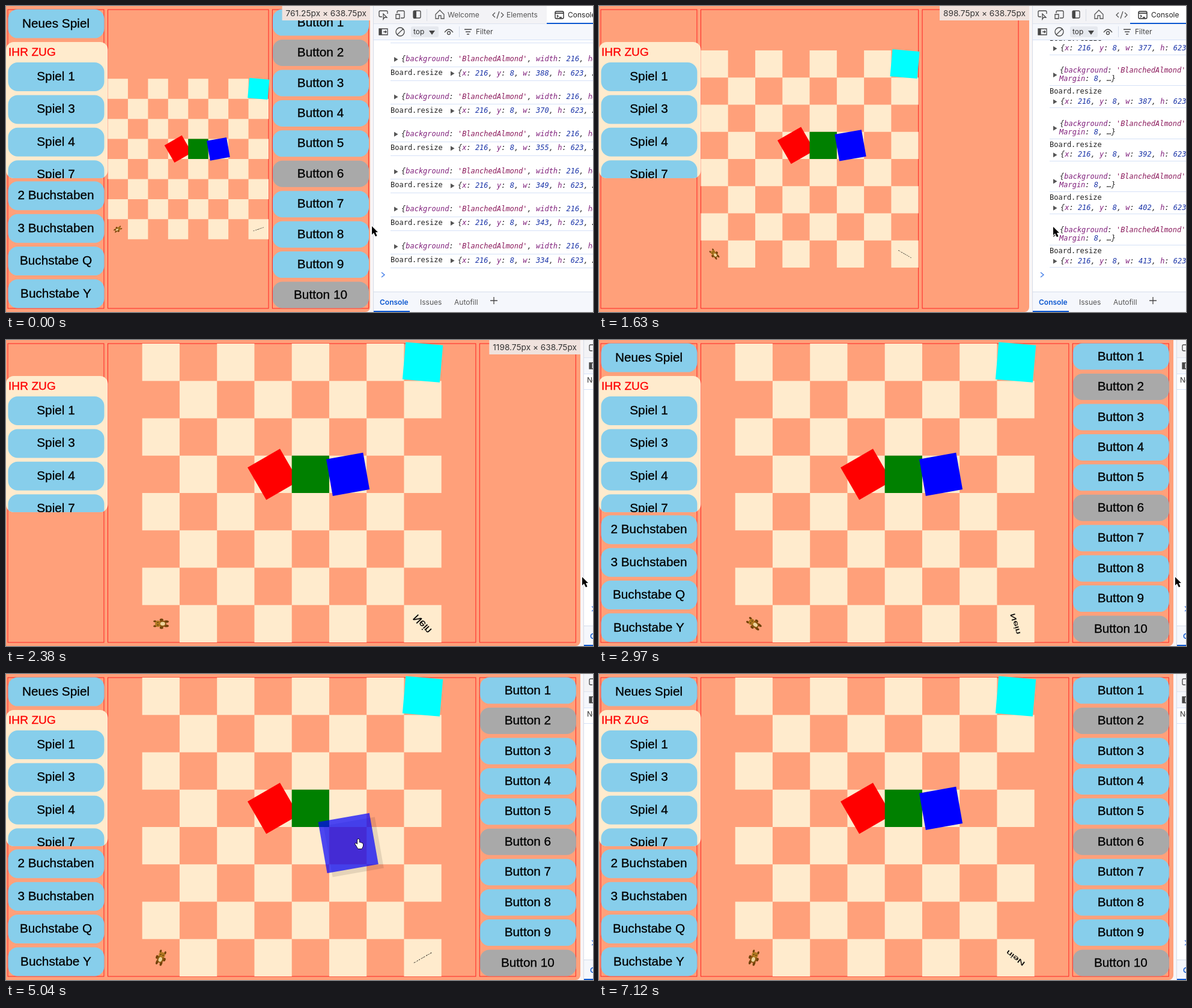
Animation of 977x510 px, one loop 7.14 s. Source, as an HTML page with a canvas:

```html
<!DOCTYPE html>
<html lang="de">
<head>
<meta charset="utf-8">
<title>Board resize and drag</title>
<style>
html, body { margin: 0; width: 100%; height: 100%; overflow: hidden; background: #fff; }
canvas { display: block; }
</style>
</head>
<body>
<canvas id="stage" width="977" height="510"></canvas>
<script>
const c = document.getElementById('stage').getContext('2d');
const LOOP = 7140, W = 977, H = 510;
const SANS = '"Liberation Sans", Arial, sans-serif';
const UI = 'Inter, Roboto, sans-serif';
const MONO = '"DejaVu Sans Mono", "Liberation Mono", monospace';
const SKY = '#87ceeb', CREAM = '#ffebcd', SALMON = '#ffa07a', ICON = '#474747';

// Linear interpolation through [step, value] points.
function along(k, pts) {
  if (k <= pts[0][0]) return pts[0][1];
  for (let i = 1; i < pts.length; i++) {
    const [a, u] = pts[i - 1], [b, v] = pts[i];
    if (k <= b) return u + (v - u) * (k - a) / (b - a);
  }
  return pts[pts.length - 1][1];
}

const DIVIDER = [[6, 609], [7, 610], [8, 622], [9, 644], [10, 678], [11, 719], [13, 820], [15, 940], [15.7, 959]];
const POINTER_X = [[0, 609], [7, 611], [11, 756], [16, 959], [22, 959], [25, 576], [26, 577], [34, 588], [38, 592], [40, 580], [45, 940]];
const POINTER_Y = [[0, 367], [11, 368], [16, 395], [22, 395], [25, 227], [26, 232], [34, 283], [38, 300], [40, 228], [45, 520]];
const LIFT = [[25, 0], [26, 1], [40, 1], [41, 0]];
const DRAG_X = [[25, 0], [26, 1], [34, .6], [38, 5], [41, 0]];
const DRAG_Y = [[25, 0], [26, 5.6], [34, 58], [38, 75], [41, 0]];
const WORD_TURN = [[0, -20], [7, 11], [11, 30], [16, 47], [26, 115], [34, 150], [48, 217]];
const BEAR_TURN = [[0, 60], [7, 40], [11, -40], [16, -90], [26, 0], [34, 20], [48, 20]];

function rect(x, y, w, h, fill, r = 0) {
  c.fillStyle = fill;
  c.beginPath();
  c.roundRect(x, y, w, h, r);
  c.fill();
}

function text(s, x, y, font, color = '#111', align = 'left') {
  c.font = font;
  c.fillStyle = color;
  c.textAlign = align;
  c.textBaseline = 'middle';
  c.fillText(s, x, y);
}

// Page text with slightly heavier strokes.
function pageText(s, x, y, size, color = '#000', align = 'center') {
  text(s, x, y, size + 'px ' + SANS, color, align);
  c.strokeStyle = color;
  c.lineWidth = .3;
  c.strokeText(s, x, y);
}

function at(x, y, deg, draw) {
  c.save();
  c.translate(x, y);
  c.rotate(deg * Math.PI / 180);
  draw();
  c.restore();
}

function icon(x, y, d, color = ICON, fill = false) {
  at(x, y, 0, () => {
    c.strokeStyle = c.fillStyle = color;
    c.lineWidth = 1.3;
    const p = new Path2D(d);
    fill ? c.fill(p) : c.stroke(p);
  });
}

function outline(x, w) {
  c.strokeStyle = '#f22';
  c.lineWidth = 1;
  c.strokeRect(x, 6, w, 498);
}

function button(label, x, y, h, color = SKY) {
  rect(x, y, 160, h, color, 16);
  pageText(label, x + 79.5, y + h / 2 + .3, 20.8);
}

function square(x, y, size, deg, color) {
  at(x, y, deg, () => rect(-size / 2, -size / 2, size, size, color));
}

function leftPanel(showButtons) {
  rect(0, 60, 169.5, 227, CREAM, 13);
  pageText('IHR ZUG', 4, 77.7, 19.2, '#f00', 'left');
  c.save();
  c.beginPath();
  c.roundRect(0, 60, 169.5, 227, 13);
  c.clip();
  [1, 3, 4, 7].forEach((n, i) => button('Spiel ' + n, 3.5, 94 + 54.4 * i, 48));
  c.restore();
  if (!showButtons) return;
  button('Neues Spiel', 3.5, 5.6, 48);
  ['2 Buchstaben', '3 Buchstaben', 'Buchstabe Q', 'Buchstabe Y']
    .forEach((s, i) => button(s, 3.5, 292.3 + 54.4 * i, 48));
}

function bear(x, y, cell, deg) {
  at(x, y, deg, () => {
    c.scale(cell / 62, cell / 62);
    const blob = (px, py, rx, ry, color) => {
      c.fillStyle = color;
      c.beginPath();
      c.ellipse(px, py, rx, ry, 0, 0, 7);
      c.fill();
    };
    for (const s of [-1, 1]) {
      blob(4 * s, -10, 1.7, 2.6, '#704008');
      blob(6.5 * s, 1, 2, 3, '#704008');
      blob(3.5 * s, 9, 2, 4, '#704008');
    }
    blob(0, 2, 5.6, 7, '#8a5410');
    blob(0, -5, 5.3, 4.6, '#b07820');
    blob(0, 3, 3, 4, '#ecd29a');
    for (const s of [-1, 1]) blob(2 * s, -5, .8, .8, '#321c04');
  });
}

function board(k, right) {
  const size = Math.min(right - 169.5, 498), cell = size / 8;
  const left = (169.5 + right - size) / 2, top = 255 - size / 2;
  const cx = n => left + (n + .5) * cell, cy = n => top + (n + .5) * cell;
  for (let i = 0; i < 64; i++) {
    const col = i % 8, row = i >> 3;
    if ((col + row) % 2 === 0) rect(left + col * cell, top + row * cell, cell, cell, CREAM);
  }
  bear(cx(0), cy(7), cell, along(k, BEAR_TURN));
  at(cx(7), cy(7), along(k, WORD_TURN), () => {
    const flip = Math.sin(Math.PI * (k + .4) / 11.5);
    c.scale(1, Math.abs(flip) < .08 ? .08 : flip);
    pageText('Nein', 0, 0, cell * .28);
  });
  square(cx(7), cy(0), cell, 5, '#0ff');
  square(cx(3), cy(3), cell, -30, '#f00');
  square(cx(4), cy(3), cell, 0, '#008000');

  const lift = along(k, LIFT), side = cell * (1 + .39 * lift);
  const bx = cx(5) + along(k, DRAG_X), by = cy(3) + along(k, DRAG_Y);
  if (lift) square(bx + 9 * lift, by + 6.5 * lift, side, -10, 'rgba(0,0,0,.1)');
  square(bx, by, side, -10, `rgba(0,0,255,${1 - .3 * lift})`);
}

// Console values: keys, strings and numbers are coloured by pattern.
function code(s, x, y) {
  const font = 'italic 12px ' + MONO;
  for (const part of s.match(/'[^']*'|\w+(?=:)|\d+|[^\w']+|\w+/g)) {
    const color = part[0] === "'" ? '#8b1a5c' : /^\d/.test(part) ? '#1a34a8'
      : /^\w/.test(part) ? '#80207c' : '#222';
    text(part, x, y, font, color);
    x += c.measureText(part).width;
  }
}

function entry(s, x, y) {
  icon(x, y, 'M-2.5-4L4 0-2.5 4Z', '#555', true);
  code(s, x + 9.5, y);
}

function log(k, x, width) {
  const line = y => rect(x + 28, y, W, 1, '#d5e1f7');
  const label = y => text('Board.resize', x + 28, y, '12px ' + MONO, '#222');
  const size = w => `{x: 216, y: 8, w: ${w}, h: 623, …}`;
  c.save();
  c.beginPath();
  c.rect(x, 57, W, 419);
  c.clip();
  if (width < 60) {
    text('No Issues', x + 5, 67, '12px ' + UI, '#333');
    rect(x, 82, W, 1, '#d5e1f7');
  } else if (width > 300) {
    line(61);
    [388, 370, 355, 349, 343, 334].forEach((w, i) => {
      const y = 89 + 62.4 * i;
      entry("{background: 'BlanchedAlmond', width: 216, height: 623, …}", x + 36.5, y);
      line(Math.round(y + 12));
      label(y + 23);
      entry(size(w), x + 130.5, y + 23.5);
      line(Math.round(y + 35));
    });
  } else {
    [377, 387, 392, 402, 413].forEach((w, i) => {
      const y = 54.5 + 88.6 * i;
      if (i) {
        icon(x + 36.5, y - 28, 'M-2.5-4L4 0-2.5 4Z', '#555', true);
        code("{background: 'BlanchedAlmond'", x + 45, y - 35);
        code('Margin: 8, …}', x + 44, y - 21);
        line(Math.round(y - 11));
      }
      label(y);
      entry(size(w + Math.max(0, k - 11) * 30), x + 36.5, y + 16.5);
      line(Math.round(y + 26));
    });
  }
  c.restore();
}

function devtools(k, x) {
  const width = W - x, ui = '12px ' + UI;
  rect(x, 0, W, H, '#fff');
  rect(x, 0, W, 30, '#f3f3f6');
  rect(x, 30, W, 26, '#f5f7fc');
  rect(x, 29, W, 1, '#dde3ee');
  rect(x, 56, W, 1, '#d5e1f7');

  icon(x + 16, 14, 'M-2 4H-5Q-7 4-7 2V-4Q-7-6-5-6H5Q7-6 7-4V-1M0-1V8L2 5 6 5Z');
  icon(x + 44, 14, 'M-5-2V-4Q-5-6-3-6H5Q7-6 7-4V4Q7 6 5 6H1M-7 0H-1V7H-7Z');
  icon(x + 72, 14, 'M-4-6H4Q6-6 6-4V4Q6 6 4 6H-4Q-6 6-6 4V-4Q-6-6-4-6Z');
  rect(x + 66, 8, 5, 13, ICON, 1);
  rect(x + 88, 5, 1, 20, '#d8dce4');

  const wide = width > 300, full = width >= 365;
  icon(x + 110, 14, 'M-7 0L0-7 7 0V7H2V2H-2V7H-7Z', '#555');
  if (wide) text('Welcome', x + 123, 15, ui, '#555');
  const tagX = x + (wide ? 207 : 148);
  icon(tagX, 15, 'M-5-4L-9 0-5 4M5-4L9 0 5 4M2-6L-2 6', '#555');
  if (full) text('Elements', tagX + 14, 15, ui, '#555');
  const tab = full ? x + 288 : tagX + 14;
  rect(tab, 0, 95, 30, '#fff');
  rect(tab, 28, 95, 2, '#0b57d0');
  icon(tab + 21, 15, 'M-5-6H5Q7-6 7-4V4Q7 6 5 6H-5Q-7 6-7 4V-4Q-7-6-5-6ZM-7-3H7M-4 0L-2 2-4 4M0 4H4', '#222');
  text('Console', tab + 35, 15, ui, '#222');
  icon(tab + 116, 15, 'M-4-1Q-4-4 0-4T4-1V3Q4 7 0 7T-4 3ZM-3-4L-5-7M3-4L5-7M-4 1H-8M4 1H8M-4-1L-7-4M4-1L7-4M-4 4L-7 7M4 4L7 7M0-4V7');

  icon(x + 16, 43, 'M-7-5H7V5H-7ZM-3-5V5M0 0H5M3-2L5 0 3 2');
  rect(x + 9, 38, 4, 10, ICON);
  icon(x + 44, 43, 'M7 0A7 7 0 1 1-7 0A7 7 0 1 1 7 0M5-5L-5 5');
  rect(x + 62, 34, 46, 18, '#e6e9ef', 3);
  text('top', x + 66, 43.5, ui, '#333');
  icon(x + 97, 44, 'M-5-3H5L0 4Z', '#444', true);
  icon(x + 125, 43, 'M-7 1Q0-9 7 1M2.5 2A2.5 2.5 0 1 1-2.5 2A2.5 2.5 0 1 1 2.5 2');
  rect(x + 142, 34, 1, 18, '#d5dcea');
  icon(x + 157, 43, 'M-6-4H6M-4 0H4M-2 4H2');
  text('Filter', x + 170, 43.5, ui, '#444');

  log(k, x, width);
  icon(x + 15, 448, 'M-2-4L3 0-2 4', '#3b78e7');

  rect(x, 476, W, 34, '#f5f7fc');
  rect(x, 476, W, 1, '#d5dcea');
  text('Console', x + 10, 494, '600 12px ' + UI, '#0b57d0');
  text('Issues', x + 77, 494, ui, '#555');
  text('Autofill', x + 134, 494, ui, '#555');
  icon(x + 200, 491, 'M-6 0H6M0-6V6');
  rect(x, 508, 60, 2, '#0b57d0');
  rect(x - 1, 0, 1, H, '#d6dce8');
}

function tooltip(divider) {
  const s = (Math.round(divider) / .8).toFixed(2) + 'px × 638.75px';
  const font = '13.7px ' + UI;
  c.font = font;
  const w = c.measureText(s).width + 12;
  rect(divider - 3 - w, 0, w, 24, '#f0e2dd');
  text(s, divider - 9, 12.5, font, '#333', 'right');
}

function pointer(k) {
  const hand = k >= 25 && k < 41;
  const shape = new Path2D(hand
    ? 'M-3 1V-6Q-3-8-1.5-8T0-6V-2Q1-3 2-1.5 3-2.5 4-1 6-1.5 6 1V4L4 8H-2L-5 3-7 0Q-6-2-3 1Z'
    : 'M0 0V14L3 11 6 17 8.5 16 6 10H10Z');
  at(along(k, POINTER_X), along(k, POINTER_Y), 0, () => {
    c.lineJoin = 'round';
    c.lineWidth = hand ? 1.4 : 2;
    c.strokeStyle = hand ? '#000' : '#fff';
    c.stroke(shape);
    c.fillStyle = hand ? '#fff' : '#000';
    c.fill(shape);
  });
}

function draw(k) {
  const divider = along(k, DIVIDER);
  const right = k ? along(k - .25, DIVIDER) - 177.1 : 437;
  const showButtons = k === 0 || k >= 20;

  rect(0, 0, W, H, '#f8f5f6');
  rect(0, 0, divider - 3, H, SALMON, [0, 0, 8, 0]);
  outline(3, 160);
  outline(169.5, right - 169.5);
  outline(right + 6.4, 160);
  leftPanel(showButtons);
  board(k, right);
  if (showButtons) {
    for (let n = 1; n <= 10; n++) {
      button('Button ' + n, right + 7, 5.6 + 50.44 * (n - 1), 44, n % 4 === 2 ? '#a9a9a9' : SKY);
    }
  }
  if (k < 20) tooltip(divider);
  devtools(k, divider + 3);
  if (k < 46) pointer(k);
}

const start = performance.now();
function tick() {
  const t = (performance.now() - start) % LOOP;
  draw(Math.floor((t + 10) / 148.5));
  requestAnimationFrame(tick);
}
tick();
</script>
</body>
</html>
```
